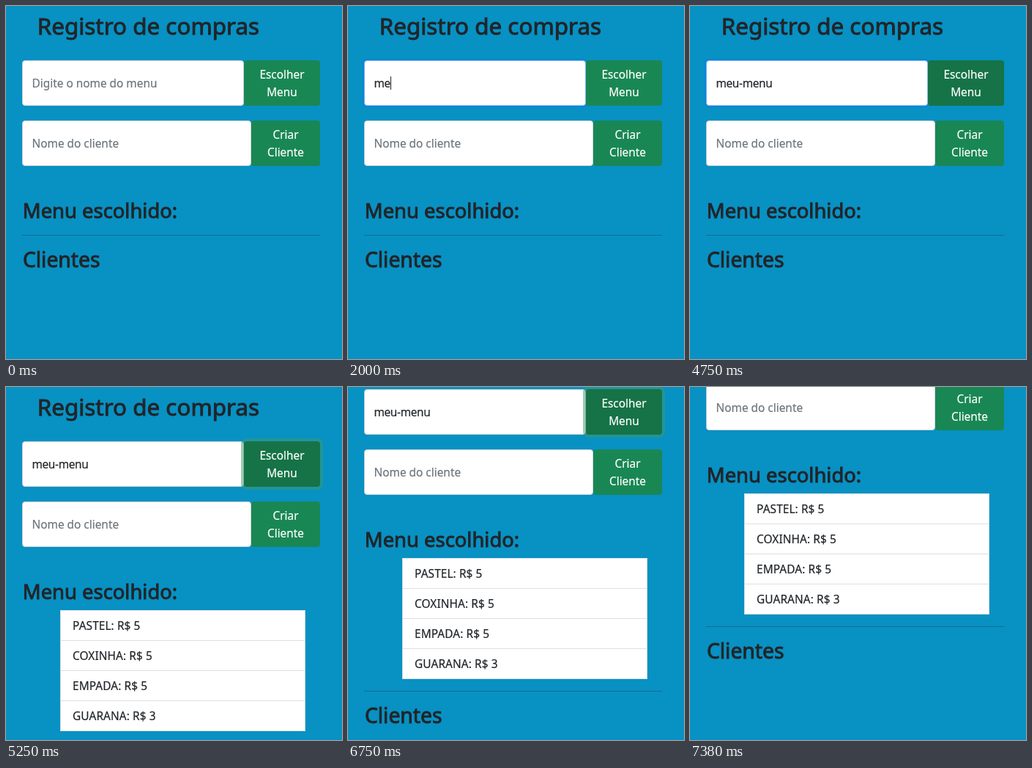
These frames come from a looping animation (459x481 px, 8 s). An HTML page:

```html
<!DOCTYPE html>
<html lang="pt">
<head>
<meta charset="utf-8">
<title>Registro de compras</title>
<style>
  html, body { margin: 0; width: 100%; height: 100%; overflow: hidden; background: #0891c3; }
  svg { display: block; width: 459px; height: 481px; }
  text { font: 15.4px "Noto Sans", "Open Sans", sans-serif; fill: #212529; stroke: #212529; stroke-width: .2; white-space: pre; }
  .head { stroke-width: .95; }
  .hint { fill: #6c757d; stroke: #6c757d; }
  .btn { fill: #fff; stroke: #fff; text-anchor: middle; }
  .item { letter-spacing: .1px; }
  .typed { letter-spacing: -.35px; }
</style>
</head>
<body>
<svg id="stage" viewBox="0 0 459 481"></svg>
<script>
const LOOP = 8000;
const stage = document.getElementById('stage');

function add(parent, tag, attrs, text) {
  const el = document.createElementNS('http://www.w3.org/2000/svg', tag);
  for (const k in attrs) el.setAttribute(k, attrs[k]);
  if (text) el.textContent = text;
  parent.appendChild(el);
  return el;
}
const show = (el, on) => el.setAttribute('visibility', on ? 'visible' : 'hidden');
const clamp = v => Math.max(0, Math.min(1, v));
const mix = (a, b, p) => `rgb(${a.map((v, i) => Math.round(v + (b[i] - v) * p))})`;

const page = add(stage, 'g', {});

// Rounded box from x1 to x2, grown outwards by a margin
function box(x1, x2, y, grow, attrs) {
  return add(page, 'rect', {
    x: x1 - grow, y: y - grow, width: x2 - x1 + 2 * grow, height: 62 + 2 * grow,
    rx: 4 + grow, ...attrs
  });
}

function heading(parent, x, y, size, text) {
  return add(parent, 'text', { x, y, class: 'head', style: `font-size:${size}px` }, text);
}

function row(y, split, hint, words) {
  const glow = box(22, split, y, 2.5, { fill: 'rgb(13,110,253)', opacity: 0 });
  const field = box(22, split, y, -.5, { fill: '#fff', stroke: '#ced4da' });
  const label = add(page, 'text', { x: 35.5, y: y + 36.5, class: 'hint' }, hint);
  const ring = box(split, 429, y, 4, { fill: 'rgb(60,153,110)', opacity: 0 });
  const button = box(split, 429, y, 0, { fill: '#198754' });
  words.forEach((word, i) =>
    add(page, 'text', { x: (split + 429) / 2, y: y + 24.5 + 24 * i, class: 'btn' }, word));
  return { glow, field, label, ring, button };
}

heading(page, 42.7, 39, 31.4, 'Registro de compras');
row(156, 335, 'Nome do cliente', ['Criar', 'Cliente']);
const menu = row(74, 325, 'Digite o nome do menu', ['Escolher', 'Menu']);
const typed = add(page, 'text', { x: 35.5, y: 110.5, class: 'typed' });
const caret = add(page, 'rect', { y: 96, width: 1, height: 18, fill: '#212529' });

heading(page, 22.8, 289, 27.4, 'Menu escolhido:');

const list = add(page, 'g', {});
add(list, 'rect', { x: 74.5, y: 304.5, width: 334, height: 164, fill: '#fff', stroke: '#dfe3e6' });
['PASTEL: R$ 5', 'COXINHA: R$ 5', 'EMPADA: R$ 5', 'GUARANA: R$ 3'].forEach((item, i) => {
  const y = 304 + 41 * i;
  if (i) add(list, 'rect', { x: 75, y, width: 333, height: 1, fill: '#dfdfdf' });
  add(list, 'text', { x: 91, y: y + 26.5, class: 'item' }, item);
});

const below = add(page, 'g', {});
add(below, 'rect', { x: 22, y: 312, width: 407, height: 1, fill: '#212529', opacity: .32 });
heading(below, 22.9, 356, 28.3, 'Clientes');

const WORD = 'meu-menu';
const KEYS = [1880, 2000, 2130, 2380, 2880, 3130, 3130, 3250];
const FOCUS = 1250, HOVER = 4500, PRESS = 4750, LISTED = 5000, SCROLL = 6630;

function scrollAt(t) {
  if (t < SCROLL) return 0;
  const p = clamp(Math.floor((t - SCROLL + 5) / 125) / 6);
  return Math.floor(33 + 126 * (1 - (1 - p) ** 2));
}

function draw(t) {
  const count = KEYS.filter(k => t >= k).length;
  const focused = t >= FOCUS && t < PRESS;
  const blinkOff = (t >= 1630 && t < 1880) || (t >= 3880 && t < HOVER);
  const focus = t < PRESS ? clamp((t - FOCUS) / 150) : 1 - clamp((t - PRESS) / 150);

  menu.glow.setAttribute('opacity', .25 * focus);
  menu.field.setAttribute('stroke', mix([206, 212, 218], [134, 183, 254], focus));
  show(menu.label, !count);
  typed.textContent = WORD.slice(0, count);
  caret.setAttribute('x', Math.round(35.5 + (count ? typed.getComputedTextLength() : 0)));
  show(caret, focused && !blinkOff);

  menu.button.setAttribute('fill', mix([25, 135, 84], [21, 115, 71], clamp((t - HOVER) / 150)));
  menu.ring.setAttribute('opacity', .5 * clamp((t - PRESS) / 150));

  const listed = t >= LISTED;
  show(list, listed);
  below.setAttribute('transform', `translate(0 ${listed ? 173 : 0})`);
  page.setAttribute('transform', `translate(0 ${-scrollAt(t)})`);
}

const start = performance.now();
function tick() {
  draw((performance.now() - start) % LOOP);
  requestAnimationFrame(tick);
}
tick();
</script>
</body>
</html>
```
